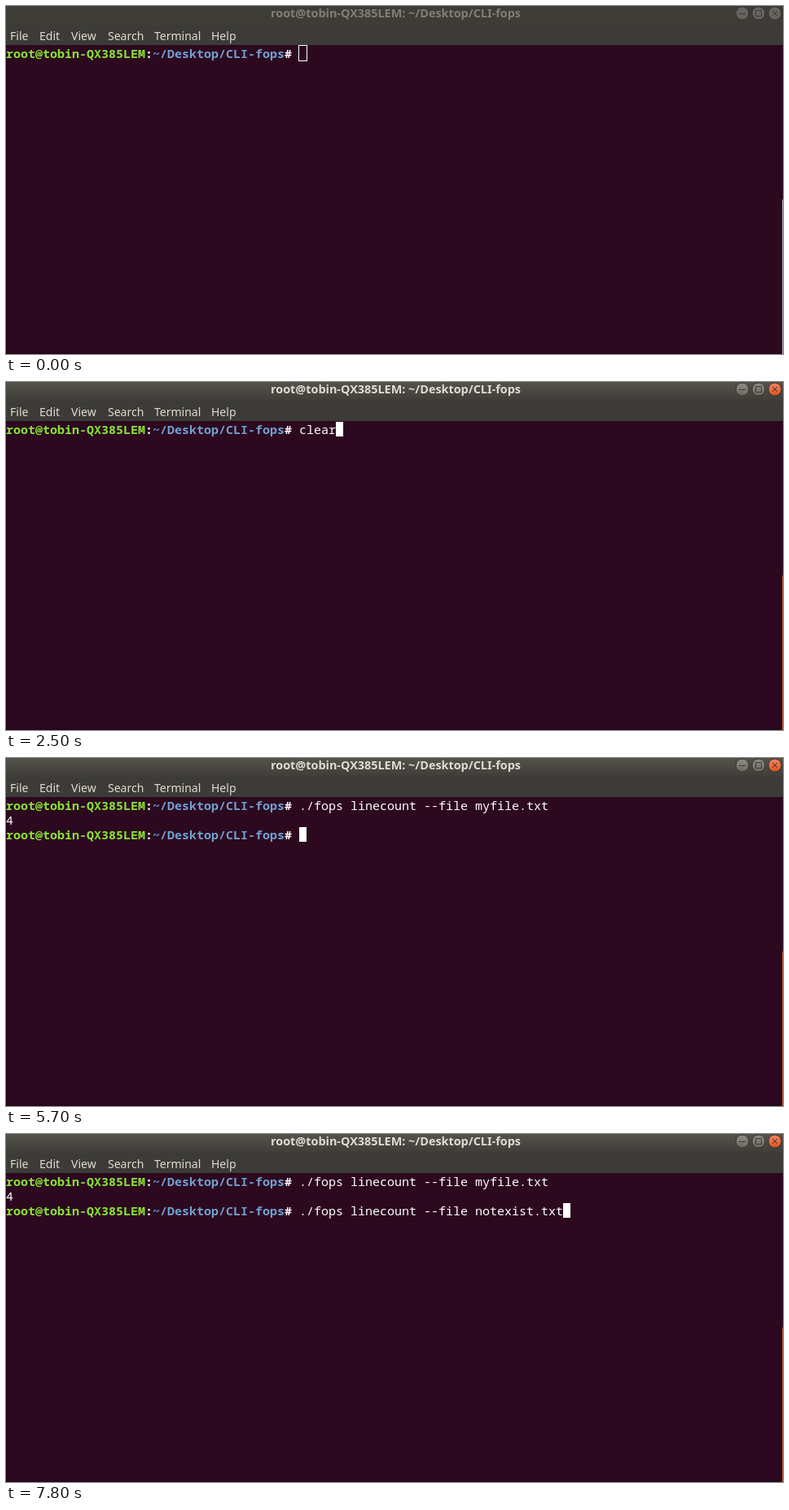
Animation of 954x428 px, one loop 8000 ms. Source, as an HTML page:

```html
<!DOCTYPE html>
<html lang="en">
<head>
<meta charset="utf-8">
<title>Terminal session</title>
<style>
  html, body { margin: 0; width: 100%; height: 100%; overflow: hidden; background: #2c091f; }
  svg { display: block; width: 954px; height: 428px; }
  text { white-space: pre; }
  .ui { font: 14px "Noto Sans", "Open Sans", sans-serif; fill: #dfdbd2; }
  .title { font: bold 14.4px "Noto Sans", "Open Sans", sans-serif; fill: #807e77; text-anchor: middle; }
  .term { font: 15px "Noto Sans Mono", "DejaVu Sans Mono", monospace; fill: #fff; }
  .prompt { font-weight: bold; }
  .user { fill: #8ae234; }
  .path { fill: #729fcf; }
  .bar { fill: #3d3c37; }
  .button { fill: #66645e; stroke: #353430; }
  .glyph { fill: none; stroke: #3a3934; }
  .thumb { fill: #b9b0b2; }
  .focused .title { fill: #dfdbd2; }
  .focused .bar { fill: url(#barFill); }
  .focused .button { fill: url(#buttonFill); }
  .focused .close { fill: url(#closeFill); }
  .focused .thumb { fill: #b5593a; }
</style>
</head>
<body>
<svg id="stage" viewBox="0 0 954 428">
  <defs>
    <linearGradient id="barFill" x2="0" y2="1">
      <stop offset="0" stop-color="#54534b"/>
      <stop offset="1" stop-color="#3c3b37"/>
    </linearGradient>
    <linearGradient id="buttonFill" x2="0" y2="1">
      <stop offset="0" stop-color="#8f8d86"/>
      <stop offset="1" stop-color="#6b6962"/>
    </linearGradient>
    <linearGradient id="closeFill" x2="0" y2="1">
      <stop offset="0" stop-color="#f5835e"/>
      <stop offset="1" stop-color="#e4501f"/>
    </linearGradient>
    <g id="prompt">
      <text class="term prompt"><tspan class="user">root@tobin-QX385LEM</tspan><tspan x="171">:</tspan><tspan class="path" x="180">~/Desktop/CLI-fops</tspan><tspan x="342">#</tspan></text>
    </g>
  </defs>

  <rect width="954" height="428" fill="#2c091f"/>
  <rect y="426" width="954" height="2" fill="#23071a"/>
  <rect width="954" height="48" fill="#3c3b37"/>
  <rect class="bar" width="954" height="25"/>
  <text class="title" x="478.5" y="14">root@tobin-QX385LEM: ~/Desktop/CLI-fops</text>

  <circle class="button" cx="904" cy="9" r="8"/>
  <circle class="button" cx="924" cy="9" r="8"/>
  <circle class="button close" cx="944" cy="9" r="8"/>
  <path class="glyph" d="M900 9.5h8M920.5 5.5h7v7h-7zM941 6l6 6m0-6l-6 6"/>

  <g class="ui">
    <text x="5" y="42">File</text>
    <text x="41" y="42">Edit</text>
    <text x="80" y="42">View</text>
    <text x="125" y="42">Search</text>
    <text x="182" y="42">Terminal</text>
    <text x="252" y="42">Help</text>
  </g>
  <rect class="thumb" x="953" y="238" width="1" height="190"/>

  <use href="#prompt" y="64"/>
  <text class="term" id="line1" x="360" y="64"></text>
  <g id="result">
    <text class="term" y="82">4</text>
    <use href="#prompt" y="100"/>
    <text class="term" id="line2" x="360" y="100"></text>
  </g>

  <rect id="hollow" x="359.5" y="48.5" width="10" height="19" fill="none" stroke="#fff"/>
  <rect id="block" width="9" height="18" fill="#fff"/>
  <path id="arrow" d="M474.5 39.5v15l3.5-3.2 2.6 6 2.4-1-2.6-5.8h5z" fill="#111" stroke="#eee"/>
  <path id="beam" d="M-3 -6.5h2.5M.5 -6.5h2.5M-3 6.5h2.5M.5 6.5h2.5M0 -6.5v13" fill="none" stroke="#e6e8d0"/>
</svg>
<script>
  const LOOP = 8000;
  const el = id => document.getElementById(id);
  const show = (id, on) => { el(id).style.display = on ? "" : "none"; };
  const lineCount = file => "./fops linecount --file " + file;

  // Each entry: start time, value held until the next entry
  const firstLine = [
    [0, ""], [2500, "clear"], [3000, lineCount("cmd")],
    [3500, lineCount("notexist.txt")], [4000, lineCount("myfile.txt")]
  ];
  const secondLine = [
    [0, ""], [5800, lineCount("myfile.txt")], [6100, "clear"],
    [6800, lineCount("cmd")], [7000, lineCount("notexist.txt")]
  ];
  const blink = [
    [0, false], [1500, true], [4300, false], [4500, true],
    [5100, false], [5700, true], [7400, false], [7800, true]
  ];
  const beamPath = [
    [0, null], [900, [478.5, 58]], [1000, [476.5, 67]], [1100, [474.5, 75]],
    [1200, [472.5, 81]], [1300, [471.5, 80]], [2200, null]
  ];
  const at = (track, t) => track.filter(step => step[0] <= t).pop()[1];

  function draw(t) {
    const first = at(firstLine, t), second = at(secondLine, t);
    const done = t >= 5000;
    const beam = at(beamPath, t);

    el("stage").classList.toggle("focused", t >= 1600);
    el("line1").textContent = first;
    el("line2").textContent = second;
    show("result", done);

    show("hollow", t < 1500);
    show("block", at(blink, t));
    el("block").setAttribute("x", 360 + 9 * (done ? second : first).length);
    el("block").setAttribute("y", done ? 85 : 49);

    show("arrow", t >= 800 && t < 900);
    show("beam", beam);
    if (beam) el("beam").setAttribute("transform", `translate(${beam})`);
  }

  const start = performance.now();
  function tick() {
    draw(Math.max(0, performance.now() - start) % LOOP);
    requestAnimationFrame(tick);
  }
  tick();
</script>
</body>
</html>
```
